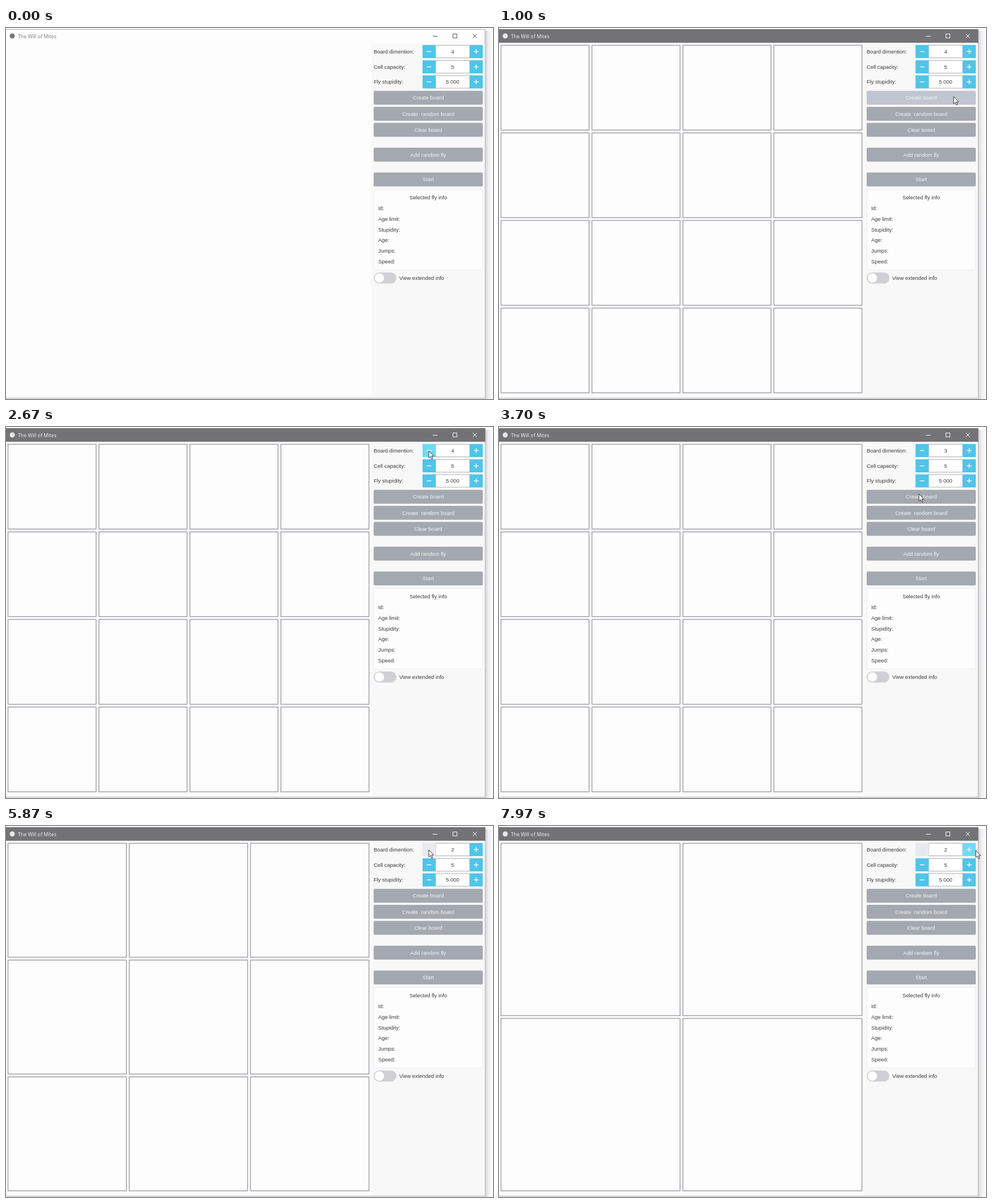
These frames come from a looping animation (857x654 px, 8000 ms). An HTML page:

```html
<!DOCTYPE html>
<html lang="en">
<head>
<meta charset="utf-8">
<title>The Will of Mites</title>
<style>
html, body { margin: 0; width: 100%; height: 100%; overflow: hidden; background: #fdfdfc; }
svg { display: block; width: 100vw; height: 100vh; }
text { font: 9.4px "Liberation Sans", Arial, sans-serif; fill: #3c3c41; white-space: pre; }
.mid { text-anchor: middle; }
.title { font: 8.8px "Open Sans", sans-serif; fill: #77777c; }
.btn { fill: #a4a8b0; }
.label { fill: #f4f4f6; }
.knob { fill: #50c4e9; }
.sign { stroke: #fff; stroke-width: 1.4; }
.cell { fill: #fdfdfd; stroke: #a2a2aa; stroke-width: 1.5; }
.icons { fill: none; stroke: #55555a; }
.active .icons { stroke: #fff; }
.active .title { fill: #f4f4f4; }

.active, .board, .value, .cursor, .press, .minus, .minusSign, .plus { animation: 8s linear infinite; }
.active, .board, .value, .minus, .minusSign, .plus { animation-timing-function: step-end; }
.active { animation-name: active; }
.n4 { animation-name: board4; }
.n3 { animation-name: board3; }
.n2 { animation-name: board2; }
.v4 { animation-name: value4; }
.v3 { animation-name: value3; }
.v2 { animation-name: value2; }
.cursor { animation-name: move; }
.press { animation-name: press; }
.minus { animation-name: minus; }
.minusSign { animation-name: minusSign; }
.plus { animation-name: plus; }

@keyframes active { 0% { opacity: 0 } 8.75%, 100% { opacity: 1 } }
@keyframes board4 { 0% { opacity: 0 } 10.6% { opacity: 1 } 51.6%, 100% { opacity: 0 } }
@keyframes board3 { 0% { opacity: 0 } 51.6% { opacity: 1 } 88.8%, 100% { opacity: 0 } }
@keyframes board2 { 0% { opacity: 0 } 88.8%, 100% { opacity: 1 } }
@keyframes value4 { 0% { opacity: 1 } 37.5%, 100% { opacity: 0 } }
@keyframes value3 { 0% { opacity: 0 } 37.5% { opacity: 1 } 73.37%, 100% { opacity: 0 } }
@keyframes value2 { 0% { opacity: 0 } 73.37%, 100% { opacity: 1 } }
@keyframes minus {
  0% { fill: #50c4e9 } 31% { fill: #6fdaf5 } 44% { fill: #50c4e9 }
  66.5% { fill: #6fdaf5 } 73.37%, 100% { fill: #e9e9f0 }
}
@keyframes minusSign { 0% { opacity: 1 } 73.37%, 100% { opacity: 0 } }
@keyframes plus { 0% { fill: #50c4e9 } 96.8%, 100% { fill: #6fdaf5 } }
@keyframes press {
  0%, 8.75% { fill: #a4a8b0 }
  9%, 10.6% { fill: #63656e }
  12.4%, 31.3% { fill: #c1c5d1 }
  33.2%, 50% { fill: #a4a8b0 }
  50.3%, 51.6% { fill: #63656e }
  53.7%, 66.9% { fill: #c1c5d1 }
  68.7%, 87% { fill: #a4a8b0 }
  87.1%, 88.8% { fill: #63656e }
  91.2%, 97.5% { fill: #c1c5d1 }
  99.4%, 100% { fill: #a4a8b0 }
}
@keyframes move {
  0%, 4.99% { transform: translate(838px, 660px); opacity: 0 }
  5% { transform: translate(838px, 654px); opacity: 1 }
  8.75%, 15.4% { transform: translate(800px, 121px) }
  20% { transform: translate(802px, 125px) }
  25.4% { transform: translate(798px, 118px) }
  26.6% { transform: translate(794px, 104px) }
  31.25% { transform: translate(745px, 41px) }
  33.4%, 43.4% { transform: translate(744px, 42px) }
  46.25% { transform: translate(739px, 118px) }
  47.9%, 61.6% { transform: translate(738px, 126px) }
  62.1% { transform: translate(739px, 110px) }
  66.9%, 73.4% { transform: translate(744px, 42px) }
  80.9%, 91.25% { transform: translate(736px, 128px) }
  97.1% { transform: translate(830px, 42px) }
  99.6%, 100% { transform: translate(839px, 43px); opacity: 1 }
}
</style>
</head>
<body>
<svg viewBox="0 0 857 654" preserveAspectRatio="none">
  <defs>
    <linearGradient id="shade">
      <stop offset="0" stop-color="#cfcfd8"/>
      <stop offset=".4" stop-color="#eeeef1"/>
      <stop offset="1" stop-color="#fdfdfc"/>
    </linearGradient>
    <path id="controls" d="M751 14.5h8.5M786.5 10.5h7v7h-7zM821.5 10.5l7 7M828.5 10.5l-7 7"/>
  </defs>
  <rect x="843" y="5" width="14" height="649" fill="url(#shade)"/>
  <rect y="2" width="843.5" height="651" fill="#a9a9b0"/>
  <rect y="3" width="842.5" height="649" fill="#fdfdfd"/>
  <rect x="643" y="27" width="199.5" height="625" fill="#f8f8f8"/>
  <g>
    <circle cx="11" cy="14" r="4.5" fill="#77777c"/>
    <text class="title" x="21" y="18">The Will of Mites</text>
    <use class="icons" href="#controls"/>
  </g>
  <g class="active">
    <rect y="2" width="843.5" height="24" fill="#737375"/>
    <circle cx="11" cy="14" r="4.5" fill="#e8e8e8"/>
    <text class="title" x="21" y="18">The Will of Mites</text>
    <use class="icons" href="#controls"/>
  </g>
  <g id="boards"></g>
  <g id="panel"></g>
  <path class="cursor" d="M0 0V12.6L2.9 9.9L5 14.8L7 13.9L4.9 9.2H8.7Z" fill="#fff" stroke="#222" stroke-width=".9"/>
</svg>
<script>
const rect = (x, y, w, h, attrs) => `<rect x="${x}" y="${y}" width="${w}" height="${h}" ${attrs}/>`;
// y is the middle of the line; the baseline sits on a whole pixel
const text = (x, y, str, cls = "") => `<text x="${x}" y="${Math.round(y + 3.3)}" class="${cls}">${str}</text>`;

function board(n) {
  const dx = 640.2 / n, dy = 617.6 / n;
  let cells = "";
  for (let i = 0; i < n * n; i++) {
    cells += rect(3.5 + i % n * dx, 30.5 + Math.floor(i / n) * dy, dx - 5, dy - 5, 'class="cell"');
  }
  return `<g class="board n${n}">${cells}</g>`;
}

function spinner(y, label, values, live) {
  const mid = y + 11.5;
  const cls = name => live ? name : "";
  return text(647, mid, label)
    + rect(756, y + .5, 60, 22, 'fill="#fff" stroke="#b2b2b8"')
    + rect(733, y, 23, 23, `class="knob ${cls("minus")}"`)
    + rect(816, y, 23, 23, `class="knob ${cls("plus")}"`)
    + `<path class="sign ${cls("minusSign")}" d="M740.5 ${mid}h8"/>`
    + `<path class="sign" d="M823.5 ${mid}h8M827.5 ${mid - 4}v8"/>`
    + values.map(v => text(786, mid, v, "mid " + (live ? "value v" + v : ""))).join("");
}

const button = (y, label, cls = "") =>
  rect(647, y, 192, 24.5, `rx="2" class="btn ${cls}"`) + text(743, y + 12.2, label, "mid label");

const info = ["Id:", "Age limit:", "Stupidity:", "Age:", "Jumps:", "Speed:"];

document.getElementById("boards").innerHTML = [4, 3, 2].map(board).join("");
document.getElementById("panel").innerHTML =
  spinner(30, "Board dimention:", [4, 3, 2], true)
  + spinner(57, "Cell capacity:", ["5"])
  + spinner(83.5, "Fly stupidity:", ["5 000"])
  + button(110.7, "Create board", "press")
  + button(139, "Create  random board")
  + button(167.3, "Clear board")
  + button(211, "Add random fly")
  + button(254.8, "Start")
  + rect(647.5, 284.5, 191, 142, 'fill="#fdfdfd" stroke="#ededf1"')
  + text(743, 298.5, "Selected fly info", "mid")
  + info.map((s, i) => text(655, 317.5 + i * 18.85, s)).join("")
  + rect(647, 431, 40, 19.5, 'rx="9.75" fill="#cfcfd5"')
  + '<circle cx="657" cy="440.7" r="8.3" fill="#fff"/>'
  + text(692, 440.7, "View extended info");
</script>
</body>
</html>
```
